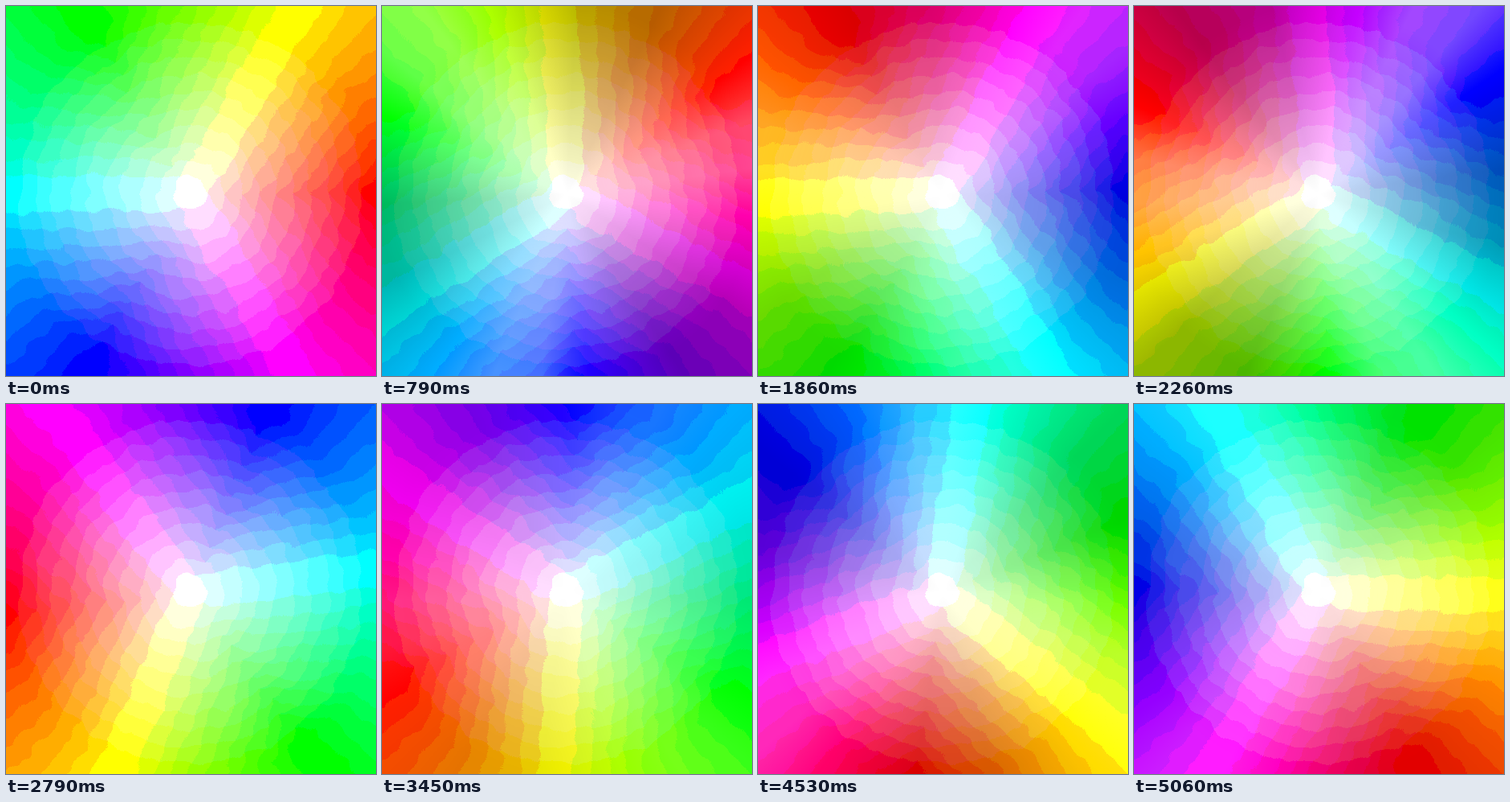
Animation of 461x460 px, one loop 5130 ms. Source, as an HTML page without scripts:

```html
<!DOCTYPE html>
<html lang="en">
<head>
<meta charset="utf-8">
<title>Turning colour wheel</title>
<style>
  @property --spin { syntax: "<angle>"; inherits: true; initial-value: 0deg; }
  @property --lobe { syntax: "<angle>"; inherits: true; initial-value: 40deg; }
  @property --dim { syntax: "<number>"; inherits: true; initial-value: 0; }

  html, body {
    margin: 0;
    width: 100%;
    height: 100%;
    overflow: hidden;
    background: #fff;
  }
  body {
    position: relative;
    animation: turn 5130ms infinite;
  }
  svg { position: absolute; }

  /* Larger than the stage, so the rippled edge stays out of view */
  .field, .light {
    position: absolute;
    left: -20px;
    top: -20px;
    width: 501px;
    height: 500px;
    overflow: hidden;
  }
  .field { filter: url(#cells); }
  .wheel, .shade {
    position: absolute;
    left: 250px;
    top: 254px;
    width: 760px;
    height: 760px;
    margin: -380px 0 0 -380px;
  }
  .wheel {
    background:
      radial-gradient(circle, #fff, rgba(255, 255, 255, 0) 235px),
      conic-gradient(from 90deg, #f00, #f0f, #00f, #0ff, #0f0, #ff0, #f00);
    transform: rotate(calc(-1 * var(--spin)));
  }
  /* Dark and pale lobes by turns, drifting at their own pace */
  .shade {
    background: repeating-conic-gradient(from 90deg,
      #000 0deg 12deg, transparent 38deg, #fff 53deg 67deg,
      transparent 82deg, #000 108deg 120deg);
    -webkit-mask-image: radial-gradient(circle, transparent, #000 235px);
    mask-image: radial-gradient(circle, transparent, #000 235px);
    transform: rotate(calc(-1 * var(--lobe)));
    opacity: var(--dim);
  }

  @keyframes turn {
    0%     { --spin: 0deg;   --lobe: 40deg;  --dim: 0;   animation-timing-function: steps(12); }
    15.39% { --spin: 32deg;  --lobe: 75deg;  --dim: .28; animation-timing-function: steps(10); }
    28.45% { --spin: 90deg;  --lobe: 95deg;  --dim: 0;   animation-timing-function: steps(12); }
    44.04% { --spin: 153deg; --lobe: 116deg; --dim: .28; animation-timing-function: steps(8); }
    54.38% { --spin: 187deg; --lobe: 125deg; --dim: 0;   animation-timing-function: steps(19); }
    78.94% { --spin: 228deg; --lobe: 135deg; --dim: .2;  animation-timing-function: steps(15); }
    98.63%, 100% { --spin: 299deg; --lobe: 175deg; --dim: .11; }
  }
</style>
</head>
<body>
<svg width="0" height="0" aria-hidden="true">
  <!-- Ripple the colours, then flatten them into cells -->
  <filter id="cells" x="0" y="0" width="1" height="1" color-interpolation-filters="sRGB">
    <feTurbulence type="fractalNoise" baseFrequency=".035" numOctaves="2" seed="4" result="noise"/>
    <feDisplacementMap in="SourceGraphic" in2="noise" scale="18" xChannelSelector="R" yChannelSelector="G"/>
    <feComponentTransfer>
      <feFuncR type="discrete" tableValues="0 .13 .23 .32 .41 .5 .59 .68 .77 .87 1"/>
      <feFuncG type="discrete" tableValues="0 .13 .23 .32 .41 .5 .59 .68 .77 .87 1"/>
      <feFuncB type="discrete" tableValues="0 .13 .23 .32 .41 .5 .59 .68 .77 .87 1"/>
    </feComponentTransfer>
  </filter>
</svg>
<div class="field"><div class="wheel"></div></div>
<div class="light"><div class="shade"></div></div>
</body>
</html>
```
